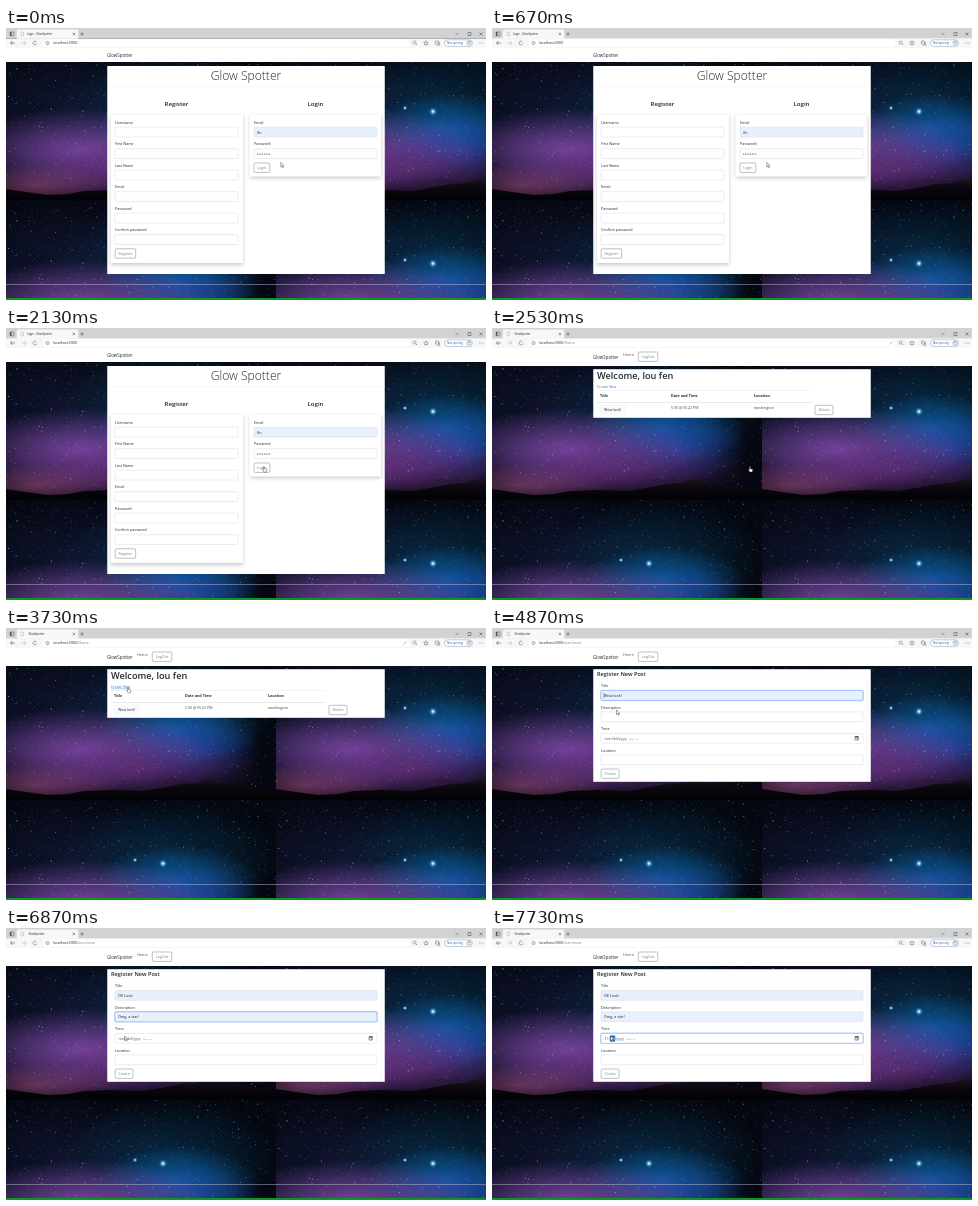
These frames come from a looping animation (480x272 px, 8 s). An HTML page with a canvas:

```html
<!DOCTYPE html>
<html lang="en">
<head>
<meta charset="utf-8">
<title>GlowSpotter</title>
<style>
html, body { margin: 0; width: 100%; height: 100%; overflow: hidden; background: #05070f; }
canvas { display: block; width: 480px; height: 272px; }
</style>
</head>
<body>
<canvas id="stage"></canvas>
<script>
const LOOP = 8000, HOME_AT = 2250, FORM_AT = 4000;
const INK = '#24282c', GRAY = '#7a8187', BLUE = '#3579d8', AUTOFILL = '#e8f0fe';
const FONT = '"Open Sans", "Noto Sans", sans-serif';
const PANEL_X = 101.25, PANEL_W = 277.5;
const stage = document.getElementById('stage');
const ratio = Math.max(1, window.devicePixelRatio || 1);
stage.width = 480 * ratio;
stage.height = 272 * ratio;
const ctx = stage.getContext('2d');
ctx.scale(ratio, ratio);

function rect(x, y, w, h, fill) {
  ctx.fillStyle = fill;
  ctx.fillRect(x, y, w, h);
}

function text(str, x, y, size = 3.7, color = INK, weight = 400, align = 'left') {
  ctx.font = `${weight} ${size}px ${FONT}`;
  ctx.textAlign = align;
  ctx.textBaseline = 'alphabetic';
  ctx.fillStyle = color;
  ctx.fillText(str, x, y + size * 0.36);
}

function box(x, y, w, h, stroke, fill = '#fff', radius = 1, line = 0.5) {
  ctx.beginPath();
  ctx.roundRect(x, y, w, h, radius);
  ctx.fillStyle = fill;
  ctx.fill();
  ctx.strokeStyle = stroke;
  ctx.lineWidth = line;
  ctx.stroke();
}

function path(points, color = '#555', width = 0.6) {
  ctx.beginPath();
  points.forEach(([x, y]) => ctx.lineTo(x, y));
  ctx.strokeStyle = color;
  ctx.lineWidth = width;
  ctx.stroke();
}

function ring(x, y, r, color = '#666', from = 0, to = 7) {
  ctx.beginPath();
  ctx.arc(x, y, r, from, to);
  ctx.strokeStyle = color;
  ctx.lineWidth = 0.5;
  ctx.stroke();
}

function button(label, x, y, w, h = 9.4, color = GRAY) {
  box(x, y, w, h, color, '#fff', 1.2);
  text(label, x + w / 2, y + h / 2, 3.7, color, 400, 'center');
}

function field(label, y, { x = 109, w = 123, value = '', filled, focus } = {}) {
  text(label, x, y);
  if (focus) box(x, y + 4.7, w, 9.8, 'rgba(110,170,250,.45)', '#fff', 1.3, 1.7);
  box(x, y + 4.7, w, 9.8, focus ? '#75aef5' : '#d5dae0', filled ? AUTOFILL : '#fff');
  text(value, x + 3, y + 9.8);
}

function shadowCard(x, y, w, h) {
  ctx.save();
  ctx.shadowColor = 'rgba(0,0,0,.22)';
  ctx.shadowBlur = 4 * ratio;
  ctx.shadowOffsetY = 1.5 * ratio;
  rect(x, y, w, h, '#fff');
  ctx.restore();
}

function makeSky() {
  const tile = document.createElement('canvas');
  tile.width = 270 * 2;
  tile.height = 152 * 2;
  const g = tile.getContext('2d');
  g.scale(2, 2);
  let seed = 41;
  const random = () => (seed = seed * 16807 % 2147483647) / 2147483647;
  const glow = (x, y, rx, ry, rgb, alpha) => {
    g.save();
    g.translate(x, y);
    g.scale(rx, ry);
    const fade = g.createRadialGradient(0, 0, 0, 0, 0, 1);
    fade.addColorStop(0, `rgba(${rgb},${alpha})`);
    fade.addColorStop(0.5, `rgba(${rgb},${alpha * 0.55})`);
    fade.addColorStop(1, `rgba(${rgb},0)`);
    g.fillStyle = fade;
    g.fillRect(-1, -1, 2, 2);
    g.restore();
  };
  g.fillStyle = '#04070f';
  g.fillRect(0, 0, 270, 152);
  glow(60, 62, 120, 70, '24,30,70', 0.55);
  glow(165, 60, 110, 62, '8,58,92', 0.65);
  glow(172, 82, 82, 36, '12,95,165', 0.9);
  glow(185, 100, 72, 34, '38,70,170', 0.75);
  glow(78, 102, 125, 42, '122,72,165', 0.95);
  glow(125, 122, 135, 34, '105,48,130', 0.7);
  glow(30, 138, 85, 22, '150,75,125', 0.6);
  for (let i = 0; i < 2300; i++) {
    const size = 0.4 + random() ** 5 * 0.7;
    g.fillStyle = `rgba(175,200,235,${0.12 + random() ** 2 * 0.6})`;
    g.fillRect(random() * 270, random() * 138, size, size);
  }
  for (const [x, y, r] of [[157, 63.5, 4], [129, 60, 2.4]]) {
    glow(x, y, r, r, '100,200,255', 0.9);
    glow(x, y, r / 2, r / 2, '255,255,255', 1);
  }
  const ridge = [[0, 141], [20, 144], [42, 147], [62, 146], [78, 143], [105, 142], [135, 143],
    [155, 140], [175, 136], [190, 135], [203, 131], [216, 135], [235, 137], [252, 141], [270, 141]];
  g.beginPath();
  g.moveTo(0, 152);
  ridge.forEach(([x, y]) => g.lineTo(x, y));
  g.lineTo(270, 152);
  const rock = g.createLinearGradient(0, 130, 0, 150);
  rock.addColorStop(0, '#1d141f');
  rock.addColorStop(0.5, '#0b080e');
  rock.addColorStop(1, '#020306');
  g.fillStyle = rock;
  g.fill();
  return tile;
}
const sky = makeSky();

function drawSky() {
  for (const y of [20, 172]) for (const x of [0, 270]) ctx.drawImage(sky, x, y, 270, 152);
}

function drawBrowser(title, url) {
  rect(0, 0, 480, 10.5, '#d0d2d4');
  rect(0, 10.5, 480, 9.5, '#f7f7f7');
  box(11, 1.8, 61, 9, '#f7f7f7', '#f7f7f7');
  box(4, 4, 4, 3.8, '#555', '#d0d2d4', 0.5);
  rect(4, 4, 1.5, 3.8, '#555');
  box(15, 4.2, 2.5, 3.5, '#888', '#fff', 0.3, 0.4);
  text(title, 21, 6, 2.75);
  path([[66.7, 4.8], [69, 7.1]]);
  path([[69, 4.8], [66.7, 7.1]]);
  path([[74.3, 6], [77.7, 6]]);
  path([[76, 4.3], [76, 7.7]]);
  path([[449.5, 6], [452.5, 6]]);
  box(462, 4.5, 3, 3, '#444', '#d0d2d4', 0);
  path([[473.5, 4.5], [476.5, 7.5]]);
  path([[476.5, 4.5], [473.5, 7.5]]);
  path([[6.5, 13], [4.5, 15], [6.5, 17]]);
  path([[4.5, 15], [9, 15]]);
  path([[18, 13], [20, 15], [18, 17]], '#bbb');
  path([[15.5, 15], [20, 15]], '#bbb');
  ring(29, 15, 1.9, '#555', 0.2, 5.6);
  box(37, 11.7, 366, 6.8, '#fff', '#fff', 3);
  ring(41.5, 15, 1.7);
  path([[41.5, 14.6], [41.5, 16]], '#666', 0.4);
  text('localhost:5000', 47, 15, 3.6);
  const hostEnd = 47 + ctx.measureText('localhost:5000').width;
  text(url, hostEnd, 15, 3.6, GRAY);
  if (url === '/Home') path([[397.5, 16.5], [400.5, 13.5]], '#888');
  ring(408.5, 14.5, 1.5);
  path([[409.7, 15.7], [411, 17]]);
  path([[420, 12.7], [420.7, 14.3], [422.4, 14.4], [421, 15.5], [421.5, 17.1],
    [420, 16.2], [418.5, 17.1], [419, 15.5], [417.6, 14.4], [419.3, 14.3], [420, 12.7]], '#555', 0.45);
  box(429.5, 13, 3, 3, '#555', '#f7f7f7', 0.5);
  path([[431, 17.2], [433.6, 17.2], [433.6, 14.2]], '#555', 0.5);
  box(438.5, 11.8, 28, 6.6, '#7f9fca', '#fff', 3.3);
  text('Not syncing', 441, 15, 2.9, '#2d5590');
  ring(463, 15, 2.1, '#777');
  ring(463, 14.4, 0.7, '#777');
  for (const x of [473, 475, 477]) rect(x - 0.3, 14.7, 0.7, 0.7, '#444');
}

function drawNav(signedIn) {
  rect(0, 20, 480, signedIn ? 18 : 14, '#fff');
  text('GlowSpotter', 101, signedIn ? 29 : 27, 4.4);
  if (!signedIn) return;
  text('Home', 131, 27, 3.8, '#555');
  button('LogOut', 146.3, 24, 19.5);
}

function drawLogin() {
  rect(PANEL_X, 38, PANEL_W, 208, '#fff');
  text('Glow Spotter', 240, 47.3, 12.1, INK, 300, 'center');
  rect(PANEL_X, 58.5, PANEL_W, 0.4, '#eee');
  text('Register', 170.5, 76, 6.1, INK, 600, 'center');
  text('Login', 309.5, 76, 6.1, INK, 600, 'center');
  shadowCard(105, 86.5, 132, 148.5);
  ['Username', 'First Name', 'Last Name', 'Email', 'Password', 'Confirm password']
    .forEach((label, i) => field(label, 94.5 + i * 21.5));
  button('Register', 109.2, 220.8, 20.5);
  shadowCard(243.5, 86.5, 131.5, 62);
  field('Email', 94.5, { x: 248, value: 'lfn', filled: true });
  field('Password', 116, { x: 248 });
  for (let i = 0; i < 8; i++) {
    ctx.beginPath();
    ctx.arc(251.5 + i * 1.75, 126, 0.5, 0, 7);
    ctx.fillStyle = INK;
    ctx.fill();
  }
  button('Login', 248, 135, 15.8);
}

function drawHome(t) {
  rect(PANEL_X, 41.2, PANEL_W, 48.6, '#fff');
  text('Welcome, lou fen', 105, 48, 9.2, INK, 600);
  text('Create New', 105, 58.8, 3.6, BLUE);
  if (t > 3450) rect(105, 60.7, 20, 0.4, BLUE);
  rect(105, 62.6, 215, 0.4, '#e2e5e8');
  text('Title', 108, 68, 3.7, INK, 700);
  text('Date and Time', 179, 68, 3.7, INK, 700);
  text('Location', 262, 68, 3.7, INK, 700);
  rect(105, 74, 215, 0.5, '#cfd3d7');
  box(108, 77, 25.5, 9.8, '#f1f3f5', '#f8f9fa', 1.2);
  text('Wow look!', 120.7, 82, 3.6, INK, 400, 'center');
  text('5:30 @ 05:22 PM', 179, 80, 3.55, '#444');
  text('washington', 262, 80, 3.7, '#444');
  button('Delete', 323, 77.3, 18);
}

function drawDate(t, active) {
  const typed = t >= 7600;
  const month = typed ? '11' : t >= 7270 ? '01' : 'mm';
  const selected = !active ? -1 : typed ? 2 : 0;
  let x = 112.5;
  [month, '/', 'dd', '/', 'yyyy', '  --:-- --'].forEach((part, i) => {
    ctx.font = `400 3.8px ${FONT}`;
    const width = ctx.measureText(part).width;
    if (i === selected) rect(x - 0.3, 107.5, width + 0.6, 6, '#1769d2');
    text(part, x, 110.4, 3.8, i === selected ? '#fff' : '#555');
    x += width;
  });
  box(363, 108.6, 3.4, 3.5, '#333', '#fff', 0.3);
  rect(363, 108.4, 3.4, 1.1, '#333');
  rect(364.6, 110.4, 1, 1, '#333');
}

function drawForm(t) {
  const titleFocus = t >= 4400 && t < 5470;
  const preview = t >= 4730, chosen = t >= 5070;
  const described = t >= 6530, timeFocus = t >= 6930;
  const descriptionFocus = t >= 5470 && !timeFocus;
  rect(PANEL_X, 41.2, PANEL_W, 112.6, '#fff');
  text('Register New Post', 105, 45.6, 5.6, INK, 600);
  rect(105, 50.5, 270.5, 0.3, '#eee');
  rect(375.5, 50.5, 0.4, 103, '#e4e6e8');
  field('Title', 57.8, {
    w: 262, value: chosen ? 'OK Look:' : preview ? 'Wow look!' : '', filled: preview, focus: titleFocus
  });
  if (titleFocus) rect(111.8, 65, 0.4, 5.2, INK);
  field('Description', 79.2, {
    w: 262, value: described ? 'Omg, a star!' : '', filled: described, focus: descriptionFocus
  });
  if (descriptionFocus && !described) rect(112, 86.4, 0.4, 5.2, INK);
  field('Time', 100.7, { w: 262, focus: timeFocus });
  drawDate(t, timeFocus);
  field('Location', 122.2, { w: 262 });
  button('Create', 109.2, 141, 17.8);
}

// Pointer stops: time, x, y.
const stops = [[0, 274.8, 134.5], [1330, 274.8, 134.5], [1930, 257.5, 138.7], [2800, 257.5, 138.7],
  [3530, 121.5, 59.5], [4030, 121.5, 59.5], [4350, 122, 67], [4450, 122, 67], [4800, 124.5, 82],
  [5130, 124.5, 82], [5430, 122, 89], [5530, 122, 89], [5800, 122, 94.3],
  [6400, 122, 94.3], [6870, 118.5, 108], [8000, 118.5, 108]];

function pointerAt(t) {
  const i = stops.findIndex(([time]) => time > t);
  const [t0, x0, y0] = stops[i - 1], [t1, x1, y1] = stops[i];
  const p = (t - t0) / (t1 - t0), ease = p * p * (3 - 2 * p);
  return [x0 + (x1 - x0) * ease, y0 + (y1 - y0) * ease];
}

const ARROW = new Path2D('M0 0V4.6L1.1 3.6L1.8 5.2L2.6 4.9L1.9 3.3H3.3Z');
const HAND = new Path2D('M0 0Q.8-.5 1 .3V2L3 2.6Q3.4 2.8 3.2 3.6L2.8 5.4H.5L-1 3.5Q-1 2.6 0 3Z');

function drawPointer(t) {
  const hand = (t > 1800 && t < 2900) || (t > 3450 && t < 4070);
  ctx.save();
  ctx.translate(...pointerAt(t));
  ctx.fillStyle = '#fff';
  ctx.strokeStyle = '#222';
  ctx.lineWidth = 0.4;
  ctx.fill(hand ? HAND : ARROW);
  ctx.stroke(hand ? HAND : ARROW);
  ctx.restore();
}

function draw(now) {
  const t = now % LOOP;
  const signedIn = t >= HOME_AT, form = t >= FORM_AT;
  drawSky();
  drawBrowser(signedIn ? '  GlowSpotter' : 'Login - GlowSpotter', form ? '/stars/new' : signedIn ? '/Home' : '');
  drawNav(signedIn);
  if (form) drawForm(t);
  else if (signedIn) drawHome(t);
  else drawLogin();
  rect(0, 256, 480, 0.8, 'rgba(190,185,215,.6)');
  rect(0, 270, 480, 2, '#129326');
  drawPointer(t);
  requestAnimationFrame(draw);
}
requestAnimationFrame(draw);
</script>
</body>
</html>
```
